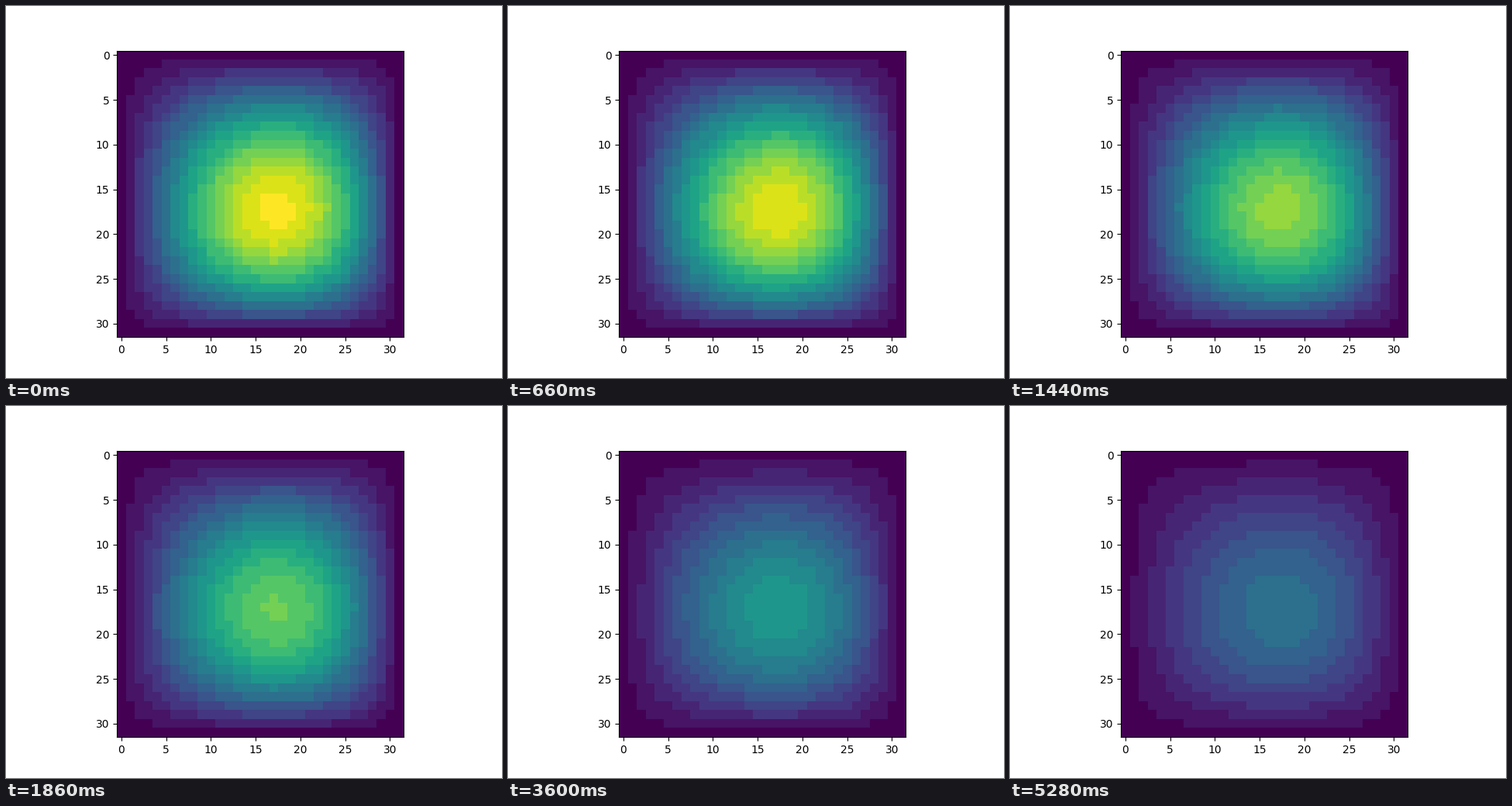
A matplotlib script that plays this animation: 640x480 px, repeating every 5.76 s.

```python
import numpy as np
import matplotlib.pyplot as plt
from matplotlib.animation import FuncAnimation

N = 32            # grid cells per side
FRAMES = 96
INTERVAL = 60     # ms
LEVELS = 19       # colour steps above zero
DRIFT = 0.0187    # skews the peak towards the lower right
DECAY = 0.21      # per second


def profile():
    """Slowest advection-diffusion mode with cold walls, peak of 1."""
    x = np.linspace(0, N - 1, 2001)

    def mode(s):
        return np.exp(DRIFT * s) * np.sin(np.pi * s / (N - 1))

    return mode(np.arange(N)) / mode(x).max()


def amplitude(t):
    """Exponential cooling that eases off a ceiling of 1."""
    q = 1.14 * np.exp(-DECAY * t)
    return (1 + q ** -20) ** (-1 / 20)


SHAPE = np.outer(profile(), profile())


def field(i):
    u = amplitude(i * INTERVAL / 1000) * SHAPE
    return np.round(u * LEVELS) / LEVELS


fig, ax = plt.subplots(figsize=(6.4, 4.8), dpi=100)
image = ax.imshow(field(0), cmap="viridis", vmin=0, vmax=1,
                  interpolation="nearest")


def update(i):
    image.set_data(field(i))
    return (image,)


anim = FuncAnimation(fig, update, frames=FRAMES, interval=INTERVAL,
                     repeat=True, repeat_delay=0)
plt.show()
```
